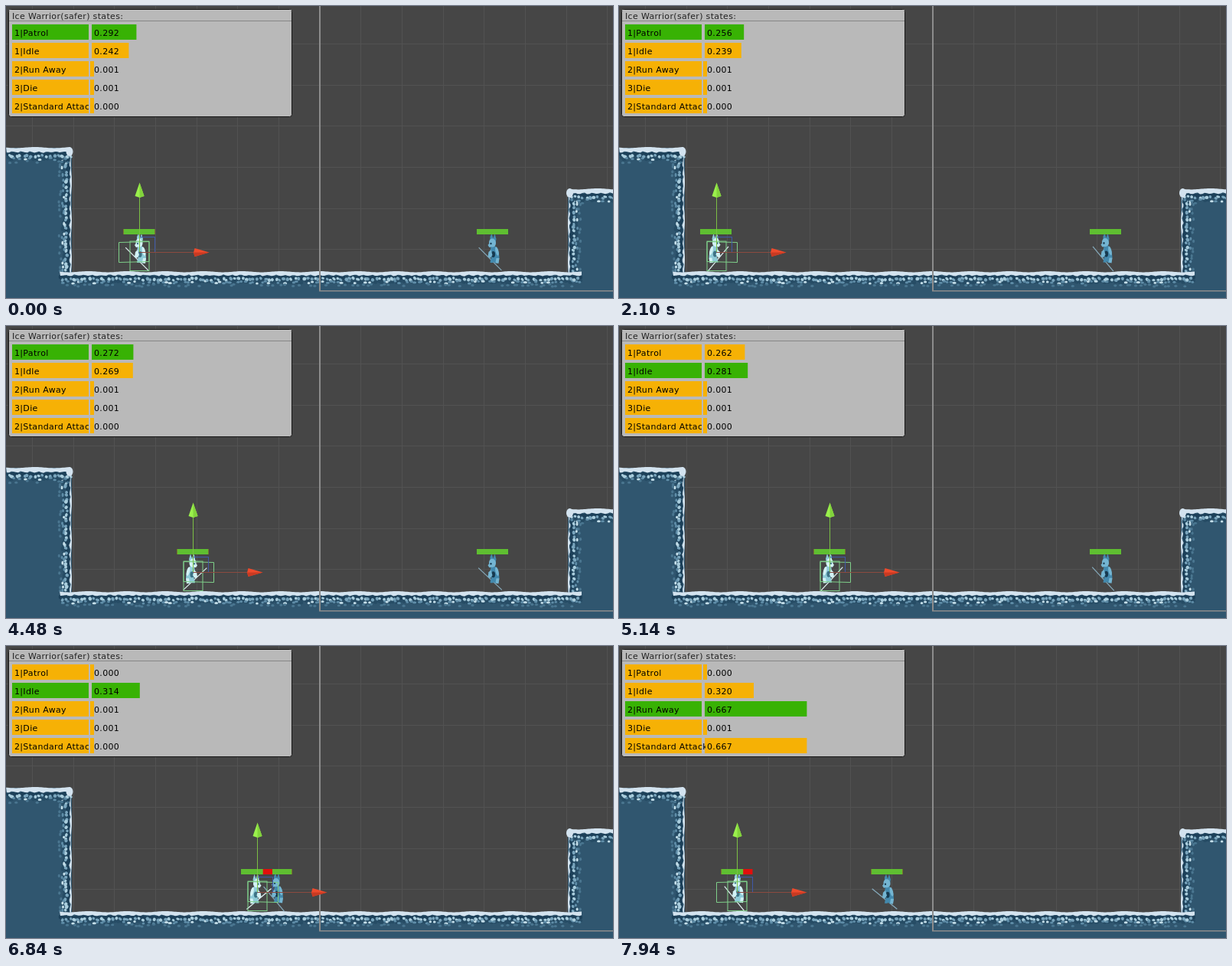
Write an HTML page with a canvas that moves like this. It is 793 px wide and 381 px high and loops after 8000 ms.

```html
<!DOCTYPE html>
<html lang="en">
<head>
<meta charset="utf-8">
<title>State utilities</title>
<style>
  html, body { margin: 0; width: 100%; height: 100%; overflow: hidden; background: #464646; }
  canvas { display: block; width: 793px; height: 381px; }
</style>
</head>
<body>
<canvas id="stage" width="793" height="381"></canvas>
<script>
const W = 793, H = 381, LOOP = 8000;
const ctx = document.getElementById('stage').getContext('2d');

// [time, x] points, linear in between
const WARRIOR = [[0, 174], [500, 128], [620, 126.5], [2100, 126.5], [2660, 178], [3000, 180], [3690, 180],
  [4480, 244], [4790, 273], [4850, 275], [5310, 275], [5800, 319], [5870, 325.5], [6000, 327.5], [6850, 327.5], [7940, 154]];
const ENEMY = [[5605, 635.5], [5800, 583], [6100, 502.5], [6660, 353], [6900, 353], [6980, 350]];

// time, active row, then the five utilities
const TICKS = [
  [0, 0, .292, .242], [500, 1, .264, .301], [1030, 1, .248, .282], [1560, 1, .252, .261],
  [2100, 0, .256, .239], [2640, 1, .288, .322], [3200, 1, .306, .316], [3660, 0, .299, .254],
  [4240, 0, .272, .269], [4770, 1, .262, .281], [5300, 0, .270, .260], [5840, 1, 0, .308],
  [6370, 1, 0, .314], [6900, 2, 0, .320, .667, .001, .667]
];
const LABELS = ['1|Patrol', '1|Idle', '2|Run Away', '3|Die', '2|Standard Attack'];

// the view repaints in bursts of evenly spaced steps
const BURSTS = [0, 60, 880, 1030, 2100, 2980, 3660, 4480, 5360, 6190, 7060, 7880, 7940];
const STEP = 73.3;

const last = (list, ok) => { let r = list[0]; for (const v of list) if (ok(v)) r = v; return r; };

function snap(t) {
  const a = last(BURSTS, v => v <= t);
  return a + Math.floor((t - a) / STEP) * STEP;
}

function along(keys, t) {
  if (t <= keys[0][0]) return keys[0][1];
  for (let i = 1; i < keys.length; i++) {
    const [t0, x0] = keys[i - 1], [t1, x1] = keys[i];
    if (t < t1) return x0 + (x1 - x0) * (t - t0) / (t1 - t0);
  }
  return keys[keys.length - 1][1];
}

function rect(g, color, x, y, w, h) { g.fillStyle = color; g.fillRect(x, y, w, h); }

function poly(g, color, pts) {
  g.fillStyle = color;
  g.beginPath();
  pts.forEach(p => g.lineTo(p[0], p[1]));
  g.fill();
}

function blob(g, color, x, y, rx, ry, turn = 0) {
  g.fillStyle = color;
  g.beginPath();
  g.ellipse(x, y, rx, ry, turn, 0, 7);
  g.fill();
}

function line(g, color, x0, y0, x1, y1, w = 1) {
  g.strokeStyle = color;
  g.lineWidth = w;
  g.beginPath();
  g.moveTo(x0, y0);
  g.lineTo(x1, y1);
  g.stroke();
}

function box(g, color, x, y, w, h) {
  g.strokeStyle = color;
  g.lineWidth = 1;
  g.strokeRect(x, y, w, h);
}

let seed = 11;
const rnd = () => (seed = seed * 16807 % 2147483647) / 2147483647;

// stones and snow along an edge: u runs on the surface, v goes into the ground
function edge(g, x, y, len, ux, uy, vx, vy, snow) {
  g.save();
  g.transform(ux, uy, vx, vy, x, y);
  for (let u = 2; u < len - 1; u += 4.6) {
    blob(g, '#1d415a', u + rnd() * 2, snow + 2.5 + rnd() * 2, 3.4, 3.2);
    blob(g, '#264c65', u + rnd() * 3, snow + 7 + rnd() * 3, 2.8, 2.4);
  }
  for (let u = 2; u < len - 2; u += 5) {
    blob(g, rnd() < .5 ? '#a9cddd' : '#79a5bd', u + rnd() * 3, snow + 4 + rnd() * 3, 1.8 + rnd(), 1.5 + rnd() * .8, rnd());
    if (rnd() < .65) blob(g, rnd() < .4 ? '#c5dfea' : '#5f8da8', u + rnd() * 4, snow + 8 + rnd() * 3, 1.7 + rnd(), 1.5);
    if (rnd() < .5) blob(g, '#4a7690', u + rnd() * 4, snow + 12 + rnd() * 3, 2.1, 1.6);
  }
  g.fillStyle = '#d3e3ef';
  g.beginPath();
  g.moveTo(0, 0);
  for (let u = 0; u <= len; u += 2) g.lineTo(u, .7 + .7 * Math.sin(u / 8));
  for (let u = len; u >= 0; u -= 3) g.lineTo(u, snow + Math.sin(u * .55) * .8 + rnd());
  g.fill();
  g.restore();
}

function buildScene() {
  const c = document.createElement('canvas');
  c.width = W;
  c.height = H;
  const g = c.getContext('2d');
  rect(g, '#464646', 0, 0, W, H);
  for (let i = 0; i < 15; i++) rect(g, '#525252', Math.round(34 + i * 53.67), 0, 1, H);
  for (let i = 0; i < 7; i++) rect(g, '#525252', 0, Math.round(49 + i * 53.67), W, 1);

  g.fillStyle = '#30566f';
  g.beginPath();
  g.roundRect(-9, 185, 95, 210, 5);
  g.roundRect(734, 240, 90, 150, 5);
  g.rect(0, 348, W, 40);
  g.fill();
  edge(g, 86, 192, 166, 0, 1, -1, 0, 2);
  edge(g, 734, 246, 112, 0, 1, 1, 0, 2);
  edge(g, 70, 346, 682, 1, 0, 0, 1, 5);
  rect(g, '#30566f', 0, 340, 64, 41);
  edge(g, 0, 184, 85, 1, 0, 0, 1, 6);
  edge(g, 735, 238, 60, 1, 0, 0, 1, 6);
  blob(g, '#d3e3ef', 83, 190, 4.5, 6);
  blob(g, '#d3e3ef', 736.5, 244, 4.5, 6);

  rect(g, '#8c8c8c', 409, 0, 2, 372);
  rect(g, '#8c8c8c', 409, 371, W - 409, 1.5);
  return c;
}

const ICE = { mid: '#8fcbd8', light: '#d3f2f5', dark: '#3d7386', spear: '#e4f4f6' };
const BLUE = { mid: '#4389ad', light: '#74b5d2', dark: '#173a50', spear: '#86abbd' };

function fighter(x, dir, skin, t, running) {
  const wave = Math.sin(t * 2 * Math.PI / 740);
  const g = ctx;
  g.save();
  g.translate(x, 321);
  g.scale(dir, 1);
  if (running) {
    line(g, skin.spear, -25, -4, 22, -18, 1.2);
    g.translate(1, -4);
    g.rotate(.1);
  } else {
    const a = Math.PI / 4 - .105 * wave, c = Math.cos(a) * 21, s = Math.sin(a) * 21;
    line(g, skin.spear, -3 - c, 9 - s, -3 + c, 9 + s, 1.2);
    g.translate(0, wave * .7);
  }
  poly(g, skin.mid, [[-3, -14], [-3, -20], [-1, -24], [1, -18], [3, -24], [5, -17], [4, -12]]);
  blob(g, skin.mid, 3, 3, 5.5, 12, -.2);
  blob(g, skin.light, 0, -12, 4.5, 5.5, -.2);
  poly(g, skin.light, [[-6, -9], [-2, -14], [1, -7], [-4, -6]]);
  blob(g, skin.light, 6, -1, 2, 6, -.25);
  blob(g, skin.dark, 1, 3, 2.6, 4);
  blob(g, skin.dark, -2, -11, 1.1, 1.3);
  poly(g, skin.light, [[-5, 0], [-2, -3], [0, 4], [-3, 8], [-6, 6]]);
  poly(g, skin.mid, [[-2, 8], [2, 9], [1, 14], [-3, 14]]);
  poly(g, skin.light, [[5, 8], [9, 8], [8, 15], [4, 14]]);
  g.restore();
}

function health(x, part) {
  rect(ctx, '#e10f0c', x - 20.5, 291, 41, 7);
  rect(ctx, '#5fbe31', x - 20.5, 291, 41 * part, 7);
}

function gizmo(x, dir) {
  const g = ctx;
  const px = Math.round(x) + .5;
  box(g, '#7fd08a', px - 12.5, 307, 25, 38.5);
  g.strokeStyle = '#7fd08a';
  g.beginPath();
  [[-12.5, 307.5], [27, 308.5], [27, 334.5], [-12.5, 333.5]].forEach(p => g.lineTo(px + p[0] * dir, p[1]));
  g.closePath();
  g.stroke();
  box(g, '#3f58a8', px, 301.5, 20, 20);
  line(g, '#8b4a40', px, 321.5, px + 72, 321.5);
  line(g, '#7cbf45', px, 321, px, 248);
  poly(g, '#9af04c', [[px, 230.5], [px + 6, 248], [px, 250], [px - 6, 248]]);
  poly(g, '#82d33c', [[px, 230.5], [px + 6, 248], [px, 250]]);
  poly(g, '#ee4a2c', [[px + 91, 321.5], [px + 72, 316], [px + 70.5, 321.5], [px + 72, 327]]);
  poly(g, '#c93a22', [[px + 91, 321.5], [px + 70.5, 321.5], [px + 72, 327]]);
}

function label(s, x, y) { ctx.fillText(s, x, y); }

function panel(t) {
  const g = ctx;
  const [, active, ...values] = last(TICKS, v => v[0] <= t);
  g.fillStyle = '#b9b9b9';
  g.strokeStyle = '#161616';
  g.lineWidth = 1;
  g.beginPath();
  g.roundRect(3.5, 4.5, 370, 140, 3);
  g.fill();
  g.stroke();
  rect(g, '#c5c5c5', 4, 5, 369, 1);
  rect(g, '#858585', 4, 19, 369, 1);
  g.font = '11px "DejaVu Sans", sans-serif';
  g.letterSpacing = '0.33px';
  g.fillStyle = '#222';
  label('Ice Warrior(safer) states:', 8, 17);
  LABELS.forEach((name, i) => {
    const y = 24 + i * 24;
    const v = values[i] ?? [0, 0, .001, .001, 0][i];
    const color = i === active ? '#38b204' : '#f6b105';
    rect(g, color, 8, y, 100, 20);
    if (v < .03) rect(g, color, 110, y, 5, 20);
    else rect(g, color, 112, y, 200 * v, 20);
    g.fillStyle = '#000';
    g.save();
    g.beginPath();
    g.rect(8, y, v < .03 ? 100 : 105, 20);
    g.clip();
    label(name, 11, y + 15);
    g.restore();
    label(v.toFixed(3), 115, y + 15);
  });
}

const scene = buildScene();

function draw(now) {
  const t = now % LOOP;
  const q = snap(t);
  const x = along(WARRIOR, q), ex = along(ENEMY, q);
  const dir = q >= 2100 && q < 6850 ? -1 : 1;
  const charging = q > 5600 && q < 6660;

  ctx.drawImage(scene, 0, 0);
  fighter(ex, 1, BLUE, q < 6660 ? q : q + 370, charging);
  fighter(x, dir, ICE, q, false);
  health(ex, 1);
  health(x, q < 6700 ? 1 : .7);
  gizmo(x, -dir);
  if (charging) {
    ctx.setLineDash([6, 3]);
    line(ctx, '#f00505', ex, 322, 348, 371, 1.4);
    ctx.setLineDash([]);
  }
  panel(t);
}

const start = performance.now();
function tick() {
  draw(performance.now() - start);
  requestAnimationFrame(tick);
}
tick();
</script>
</body>
</html>
```
